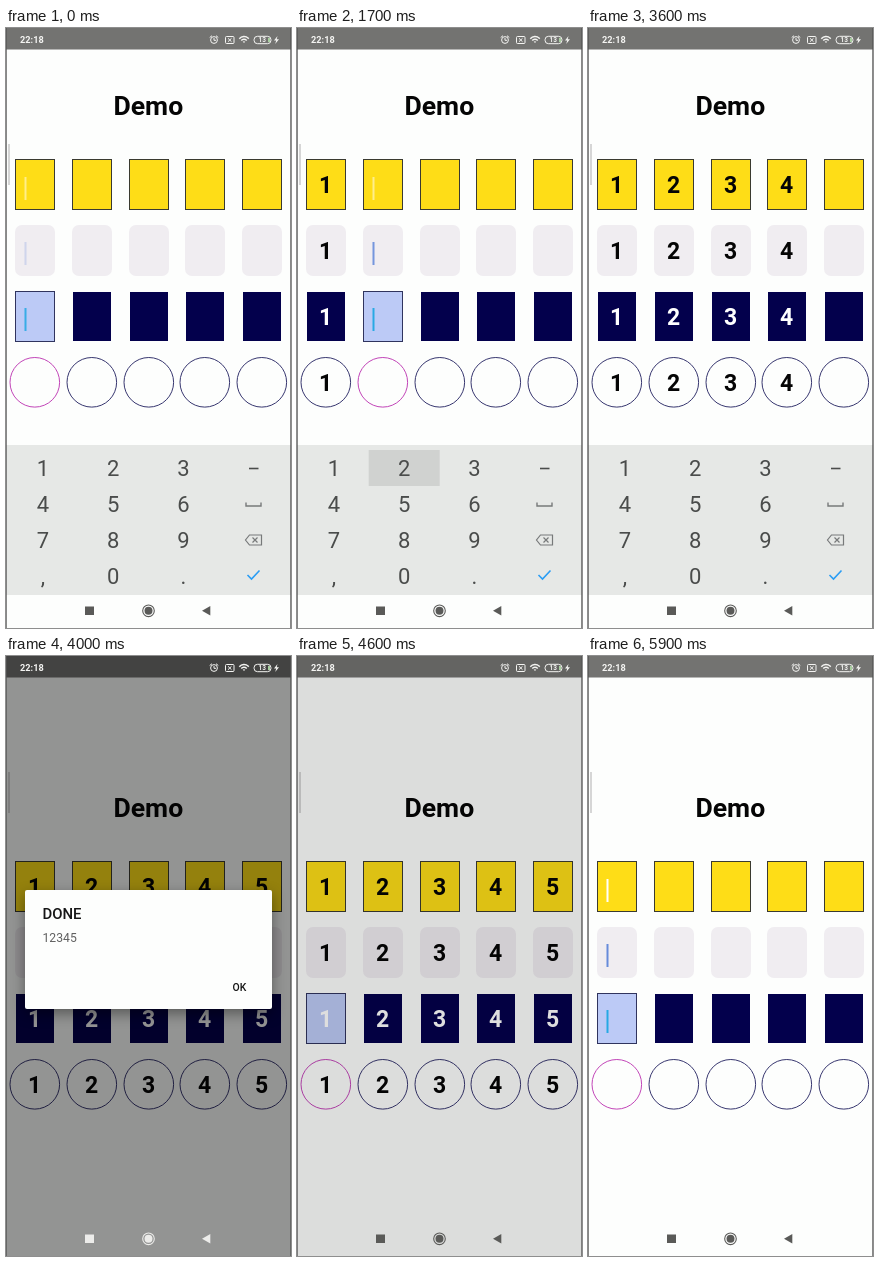
An HTML page with a canvas that plays this animation: 285 px wide and 600 px high, repeating every 6 s.

```html
<!DOCTYPE html>
<html lang="en">
<head>
<meta charset="utf-8">
<title>Code field demo</title>
<style>
html, body { margin: 0; height: 100%; overflow: hidden; background: #fdfefd; }
canvas { display: block; }
</style>
</head>
<body>
<canvas id="stage" width="285" height="600"></canvas>
<script>
const ctx = document.getElementById('stage').getContext('2d');
const LOOP = 6000;
const PAGE = '#fdfefd', NAVY = '#03004c', BLUE = '#2a9df4';
const FOCUS_TIMES = [-1400, 1500, 1900, 2350, 2850, 3550];
const TYPE_LAG = 100, REFOCUS = 4550, CLEAR = 4700;
const KEY_PRESSES = [[0, 1200, 1400], [1, 1700, 1850], [2, 2100, 2300], [4, 2700, 2850], [5, 3350, 3550]];
const KEYS = ['1', '2', '3', '', '4', '5', '6', '', '7', '8', '9', '', ',', '0', '.', ''];

const clamp = x => Math.max(0, Math.min(1, x));
const ramp = (t, from, to) => clamp((t - from) / (to - from));
const wave = turns => 0.5 + 0.5 * Math.cos(2 * Math.PI * turns);

function rect(x, y, w, h, color) {
  ctx.fillStyle = color;
  ctx.fillRect(x, y, w, h);
}

function round(x, y, w, h, r) {
  ctx.beginPath();
  ctx.roundRect(x, y, w, h, r);
}

function stroke(color, width = 1) {
  ctx.strokeStyle = color;
  ctx.lineWidth = width;
  ctx.stroke();
}

function fill(color) {
  ctx.fillStyle = color;
  ctx.fill();
}

function circle(x, y, r) {
  ctx.beginPath();
  ctx.arc(x, y, r, 0, 2 * Math.PI);
}

function path(d, color, width) {
  const shape = new Path2D(d);
  if (width) {
    ctx.strokeStyle = color;
    ctx.lineWidth = width;
    ctx.stroke(shape);
  } else {
    ctx.fillStyle = color;
    ctx.fill(shape);
  }
}

function text(str, x, y, size, weight, color, align = 'left') {
  ctx.font = `${weight} ${size}px Roboto, sans-serif`;
  ctx.textAlign = align;
  ctx.fillStyle = color;
  ctx.fillText(str, x, y);
}

function cursor(x, y, color, alpha) {
  ctx.globalAlpha = alpha;
  rect(x + 9.5, y, 2, 23, color);
  ctx.globalAlpha = 1;
}

function drawCells(i, focused, typed, age) {
  const x = 9 + Math.round(56.75 * i), mid = x + 19.8;
  rect(x, 131, 40, 51, '#3a3a30');
  rect(x + 1, 132, 38, 49, '#fedd17');

  round(x, 197, 40, 51, 7);
  fill('#f0edf1');

  if (focused) {
    rect(x, 263, 40, 51, '#30345e');
    rect(x + 1, 264, 38, 49, '#bccaf6');
  } else {
    rect(x + 1, 264, 38, 49, NAVY);
  }

  circle(mid, 354.3, 24.8);
  stroke(focused ? '#c245b8' : '#37366f');

  if (typed) {
    [165, 231, 297, 363].forEach((y, row) =>
      text(i + 1, mid - 0.3, y, 23, 700, row === 2 ? '#fff' : '#050505', 'center'));
  } else if (focused) {
    const slow = wave(age / 1030);
    cursor(x, 149, '#fff', 1 - wave(age / 800));
    cursor(x, 214, '#3a6cd4', slow);
    cursor(x, 280, '#1ea8e4', 0.8 + 0.2 * slow);
  }
}

function drawForm(t) {
  const passed = time => FOCUS_TIMES.filter(start => time >= start).length;
  let focus = passed(t) - 1, count = passed(t - TYPE_LAG) - 1;
  let age = t - FOCUS_TIMES[focus];
  if (t >= REFOCUS) focus = 0;
  if (t >= CLEAR) {
    count = 0;
    age = t - CLEAR;
  }
  text('Demo', 142.3, 87, 26.6, 700, '#050505', 'center');
  for (let i = 0; i < 5; i++) drawCells(i, i === focus, i < count, age);
}

function drawKeyboard(t) {
  rect(0, 417, 285, 150, '#e6e8e6');
  for (const [key, from, to] of KEY_PRESSES) {
    if (t >= from && t < to) rect(1 + key % 4 * 70.7, 422 + Math.floor(key / 4) * 36, 71, 36, '#d0d2d0');
  }
  KEYS.forEach((key, i) =>
    text(key, 37 + i % 4 * 70.2, 448 + Math.floor(i / 4) * 36, 22, 400, '#4a4c4b', 'center'));
  path('M243 440.5H252.5', '#4a4c4b', 1.6);
  path('M240 474.5V478H255V474.5', '#77797a', 1.4);
  path('M243.5 507H255.5V517H243.5L239.5 512ZM246.5 509.5L251.5 514.5M251.5 509.5L246.5 514.5', '#77797a', 1.2);
  path('M241.5 547L245.5 551L253.5 542.5', BLUE, 1.6);
}

function drawStatus() {
  const ink = '#f4f4f2';
  text('22:18', 14, 15, 9.2, 700, ink);
  circle(208, 12, 3.4);
  stroke(ink);
  path('M208 10V12.3H210M203.7 9.5L206 7.7M212.3 9.5L210 7.7', ink, 1);
  round(219.5, 8.5, 8.5, 7, 1);
  stroke(ink);
  path('M222 10.3L225.5 13.7M225.5 10.3L222 13.7', ink, 1);
  for (const r of [1, 3.7, 6.4]) {
    ctx.beginPath();
    ctx.arc(238, 15, r, -2.4, -0.74);
    stroke(ink, 1.5);
  }
  round(248, 8.3, 17, 7.4, 3.5);
  stroke(ink);
  rect(262, 10, 2, 4, '#a9cfa0');
  text('13', 256.3, 14.4, 6.5, 700, ink, 'center');
  path('M271.5 8L268 12.5H270.2L269.2 16L273 11.3H270.7Z', ink);
}

function drawNav(color) {
  rect(79, 578.5, 9, 8.5, color);
  circle(142.5, 582.8, 5.8);
  stroke(color, 1.1);
  circle(142.5, 582.8, 4);
  fill(color);
  path('M196 582.8L204.3 578V587.6Z', color);
}

function drawDialog(alpha) {
  ctx.save();
  ctx.globalAlpha = alpha;
  const scale = 0.92 + 0.08 * alpha;
  ctx.translate(142.5, 293.5);
  ctx.scale(scale, scale);
  ctx.translate(-142.5, -293.5);
  ctx.shadowColor = 'rgba(0,0,0,.4)';
  ctx.shadowBlur = 14;
  ctx.shadowOffsetY = 5;
  round(19, 234, 247, 119, 2);
  fill(PAGE);
  ctx.shadowColor = 'transparent';
  text('DONE', 36.5, 263, 14.9, 500, '#161616');
  text('12345', 36.5, 286.3, 12.2, 400, '#606060');
  text('OK', 226.5, 334.7, 10.4, 500, '#161616');
  ctx.restore();
}

function draw(t) {
  const shown = ramp(t, 3800, 3980) * (1 - ramp(t, 4450, 4667));
  rect(0, 0, 285, 600, PAGE);
  rect(0, 0, 285, 21.5, '#737371');

  ctx.save();
  if (t >= 3700) ctx.translate(0, 74);
  drawForm(t);
  ctx.restore();

  ctx.globalAlpha = t < 1400 ? 1 - ramp(t, 200, 600) : 1;
  rect(2, 116, 2, 41, '#d6d6d6');
  ctx.globalAlpha = 1;

  if (t < 3850) {
    ctx.save();
    ctx.translate(0, 183 * ramp(t, 3680, 3850));
    drawKeyboard(t);
    ctx.restore();
    rect(0, 567, 285, 33, PAGE);
  }
  rect(0, 0, 285, 600, `rgba(0,0,0,${0.42 * shown})`);
  rect(0, 0, 0.7, 600, '#555');
  rect(284.3, 0, 0.7, 600, '#555');
  drawStatus();
  drawNav(shown > 0.5 ? '#ececea' : '#5a5a58');
  if (shown && t < REFOCUS) drawDialog(t < 4400 ? shown : 1 - ramp(t, 4450, REFOCUS));
}

function frame() {
  draw(performance.now() % LOOP);
  requestAnimationFrame(frame);
}
frame();
</script>
</body>
</html>
```
